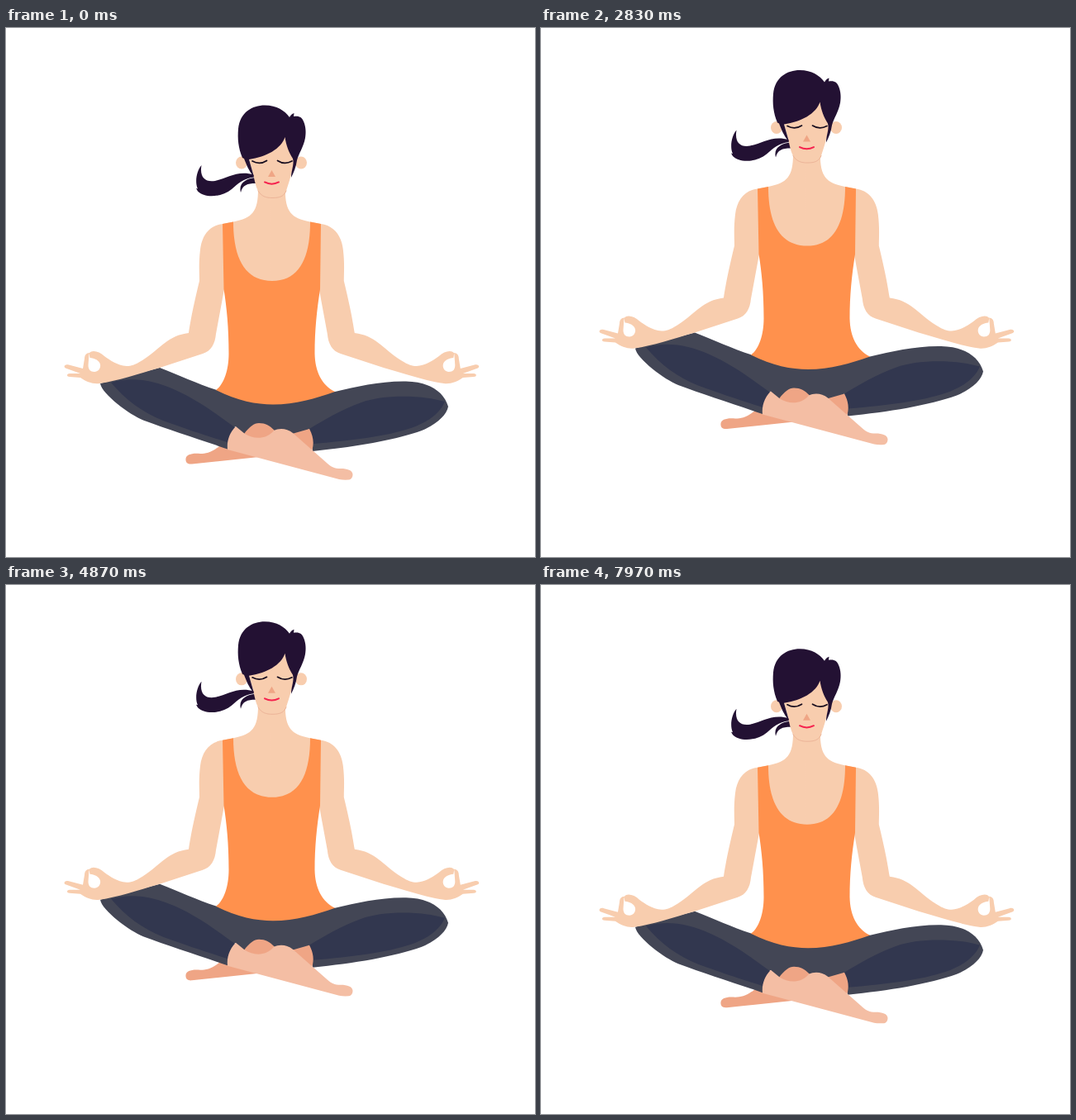
An HTML page that plays this animation: 640x640 px, repeating every 8 s.

```html
<!DOCTYPE html>
<html lang="en">
<head>
<meta charset="utf-8">
<title>Floating meditation</title>
<style>
  html, body { margin: 0; height: 100%; overflow: hidden; background: #fff; }
  svg { display: block; width: 100vw; height: 100vh; }
  .skin { fill: #f8cdae; }
  .hair { fill: #231133; }
  .pants { fill: #434655; }
  .panel { fill: #32374f; }
  .shirt { fill: #ff914d; }
  .foot { fill: #f4bea4; }
  .shade { fill: #efa585; }
  .line { fill: none; stroke-linecap: round; }
</style>
</head>
<body>
<svg viewBox="0 0 640 640">
  <g id="figure">
    <!-- Legs -->
    <path class="shade" d="M262 503C250 513 243 515 235 515C225 514 218 516 217.500 521C217 526 220 528 225 527.500L306 519L290 500Z"/>
    <path class="pants" d="M186 411L114 430C116 443 150 468 166 474.500C197 486 235 498 268 509.500L277 482L300 505H345L367 485L371 512C420 507 470 499 503 487C522 479 533 468 535 458C530 440 512 428 484 427.500C452 427 425 434 398 440L255 438C230 430 210 420 186 411Z"/>
    <path class="panel" d="M127 429C150 422 177 425 205 438C232 450 256 468 278 484L270 502C245 494 220 486 190 475C165 465 145 450 127 429Z"/>
    <path class="panel" d="M531 452C500 443 453 444 430 453C405 462 385 474 367 485L372 503C420 499 460 494 490 484C512 476 525 466 531 452Z"/>
    <path class="shade" d="M288 491C295 482 300 478 306 478C314 478 319 481 325 487L320 498H295ZM346 491L367 485C372 494 373 503 370 512Z"/>
    <path class="foot" d="M278 482C270 490 267 500 268 510L403 546Q408 547 415 546.500C418 546 419.500 543 419.500 540C419 535 413 533 405 533C397 533 394 531 389 527L347 490C340 484 330 484 324 487C315 498 300 498 289 491Z"/>

    <!-- Torso and arms, mirrored about the spine -->
    <defs>
      <g id="side">
        <path class="skin" d="M322 195H305C305 222 298 230 275 234.500L262 237C246 239 237 251 235 268C233 285 234 295 234 306C227 335 224 350 221 369C196 372 188 387 165 402C155 408 152 409 146 409C134 408 126 402 119 397C113 391 104 389 101 393C97 393 95 396 95 400L93 412L76 407.500C71 406 69 410 72 411.500L90 418L77 418C73 418 73 422 77 422L90 423C97 428 105 431 113 430C135 427 160 418.500 186 411L238 394C248 391 253 382 254 370L264 316L322 330Z"/>
        <path fill="#fff" d="M100.500 393.500L101.500 399C107 399.500 113 402 114 407C115 412 111 416 107 416C102 416 99.500 413 99.500 408Z"/>
      </g>
    </defs>
    <use href="#side"/>
    <use href="#side" transform="translate(642.8)scale(-1 1)"/>
    <path class="shirt" d="M254 438C264 431 269.500 413 269.500 394C269.500 362 267 338 263.500 316L262 237L275 234.500C275 280 290 306 322 306C355 306 368 278 368 234.500L381 237L380 316C376 342 373.500 365 373.500 394C374 416 382 432 398 440C375 448 350 455.500 323 455.500C303 455.500 280 451 254 438Z"/>

    <!-- Head -->
    <path class="hair" d="M236.500 166C234 181 241 187 253 185C268 182 279 172 300 177.500V180.500C287 182 281 188 273 195C261 205 240 206 232 197.500L230 194L232 194.500C228 186 231 172 236.500 166ZM302 181C290 182 281 188 284 199C286 190 292 188 302 188Z"/>
    <g class="skin">
      <ellipse cx="285" cy="163" rx="7" ry="7.500"/>
      <ellipse cx="357" cy="163" rx="7" ry="7.500"/>
      <path d="M293 130L294 159L299 176C301 187 303 194 306 199C310 205 316 206 322 206C332 206 337 204 339 197C343 185 346 175 349 160L345 130Z"/>
    </g>
    <path class="line" stroke="#ecb498" d="M305 197C309 204 315 205.500 322 205.500C331 205.500 336 204 339 197"/>
    <path class="hair" d="M286 157C281 145 280 134 281 122C283 102 298 93.500 313 93.500C328 93.500 337 100 343 108Q345 104 348.500 103L348 107C355 106 358 108 360 113C363 120 363 127 362 133C360 144 354 152 352 160C351 168 348 175 345 181C345 172 349 165 347 158C342 150 339 142 337.500 132C333 146 315 156 294 159L300 180C293 172 291 165 288 158Z"/>
    <path class="line" stroke="#170d1e" stroke-width="1.700" d="M298 161Q307 166 315.500 160.500M328.500 160.500Q337 166 346 161"/>
    <path class="shade" d="M321.500 172L317 180H326Z"/>
    <path class="line" stroke="#f5234e" stroke-width="2" d="M313 186.500Q321.500 191 330 186.500"/>
  </g>
</svg>
<script>
  const LOOP = 8, PEAK = 4;
  const figure = document.getElementById("figure");

  // Steady rise to the peak, then a descent that gradually slows.
  function lift(t) {
    if (t < PEAK) return 15 * t;
    const u = t - PEAK;
    return 60 - 12.5 * u + 0.095 * u ** 3;
  }

  function draw() {
    const t = (performance.now() / 1000) % LOOP;
    figure.setAttribute("transform", `translate(0 ${-lift(t)})`);
    requestAnimationFrame(draw);
  }
  draw();
</script>
</body>
</html>
```
